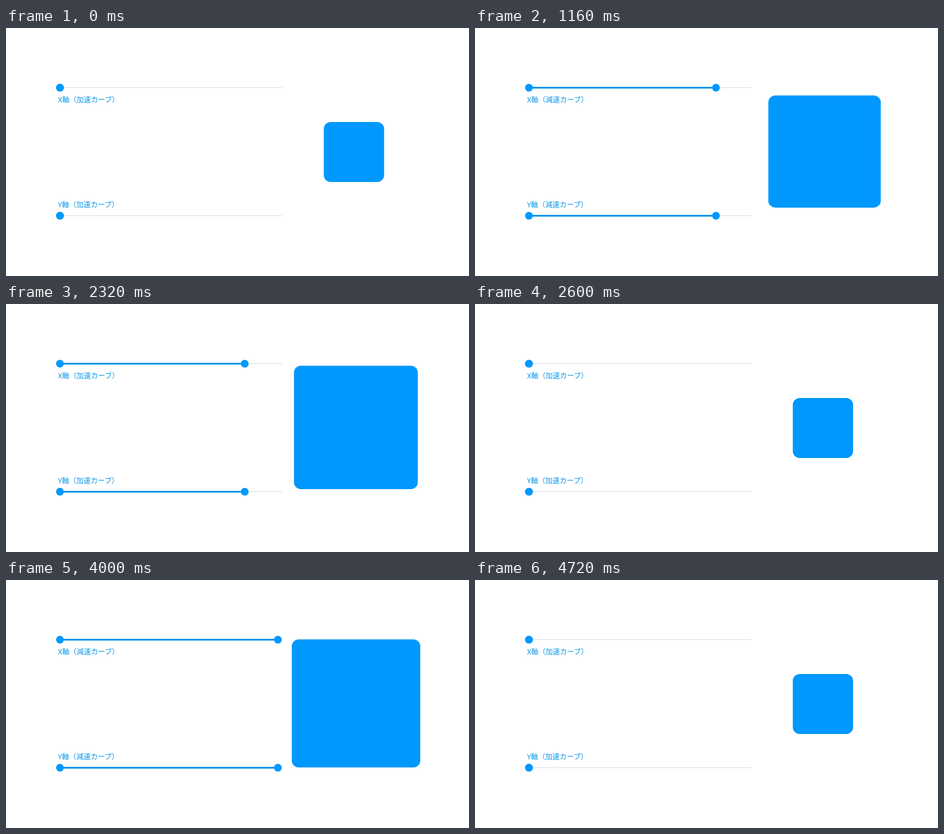
An HTML page that plays this animation: 800 px wide and 430 px high, repeating every 5.04 s.

```html
<!DOCTYPE html>
<html lang="ja">
<head>
<meta charset="utf-8">
<style>
  html, body { margin: 0; width: 100%; height: 100%; overflow: hidden; background: #fff; }
  svg { display: block; width: 800px; height: 430px; }
  circle, rect { fill: #0098fc; }
  text { font: 12.4px "Noto Sans CJK JP", "Noto Sans CJK", sans-serif; fill: #0a96e8; }
  .track { stroke: #d6d9db; stroke-width: 1; }
  .bar { stroke: #0094f0; stroke-width: 2.8; }
</style>
</head>
<body>
<svg viewBox="0 0 800 430">
  <g id="axes"></g>
  <rect id="box" rx="12"/>
</svg>
<script>
const LOOP = 5040, DURATION = 300, BOX_LAG = 35;
const START_X = 93.2, END_X = 469.8;
const CYCLES = [{ grow: 1003, shrink: 2225 }, { grow: 3363, shrink: 4345 }];

const axisMarkup = (name, lineY, textY) => `
  <line class="track" x1="93" x2="477" y1="${lineY}" y2="${lineY}"/>
  <line class="bar" x1="${START_X}" x2="${START_X}" y1="${lineY}" y2="${lineY}"/>
  <circle cx="${START_X}" cy="${lineY}" r="6.7"/>
  <circle class="knob" cx="${START_X}" cy="${lineY}" r="6.7"/>
  <text x="90" y="${textY}">${name}軸（<tspan class="curve"></tspan>カーブ）</text>`;

document.getElementById('axes').innerHTML =
  axisMarkup('X', 103.5, 128.5) + axisMarkup('Y', 325.5, 310.5);

const box = document.getElementById('box');
const bars = document.querySelectorAll('.bar');
const knobs = document.querySelectorAll('.knob');
const curves = document.querySelectorAll('.curve');

const mix = (a, b, p) => a + (b - a) * p;

// Cubic Bezier easing with end handles at heights 0 and 1.
function bezier(x1, x2) {
  return x => {
    if (x <= 0) return 0;
    if (x >= 1) return 1;
    let low = 0, high = 1, s;
    for (let i = 0; i < 24; i++) {
      s = (low + high) / 2;
      const at = 3 * (1 - s) ** 2 * s * x1 + 3 * (1 - s) * s * s * x2 + s ** 3;
      if (at < x) low = s; else high = s;
    }
    return s * s * (3 - 2 * s);
  };
}
const decelerate = bezier(0, 0.2);
const accelerate = bezier(0.4, 1);

const progress = t => CYCLES.reduce((sum, { grow, shrink }) =>
  sum + decelerate((t - grow) / DURATION) - accelerate((t - shrink) / DURATION), 0);

function setAll(nodes, name, value) {
  nodes.forEach(node => node.setAttribute(name, value));
}

function draw(t) {
  const x = mix(START_X, END_X, progress(t));
  setAll(bars, 'x2', x);
  setAll(knobs, 'cx', x);

  const p = progress(t - BOX_LAG);
  const size = mix(104.2, 222, p);
  box.setAttribute('x', mix(601.2, 604.8, p) - size / 2);
  box.setAttribute('y', mix(215, 214, p) - size / 2);
  box.setAttribute('width', size);
  box.setAttribute('height', size);

  const growing = CYCLES.some(({ grow, shrink }) => t >= grow && t < shrink);
  curves.forEach(node => node.textContent = growing ? '減速' : '加速');
}

const begin = performance.now();
function frame() {
  draw((performance.now() - begin) % LOOP);
  requestAnimationFrame(frame);
}
frame();
</script>
</body>
</html>
```
